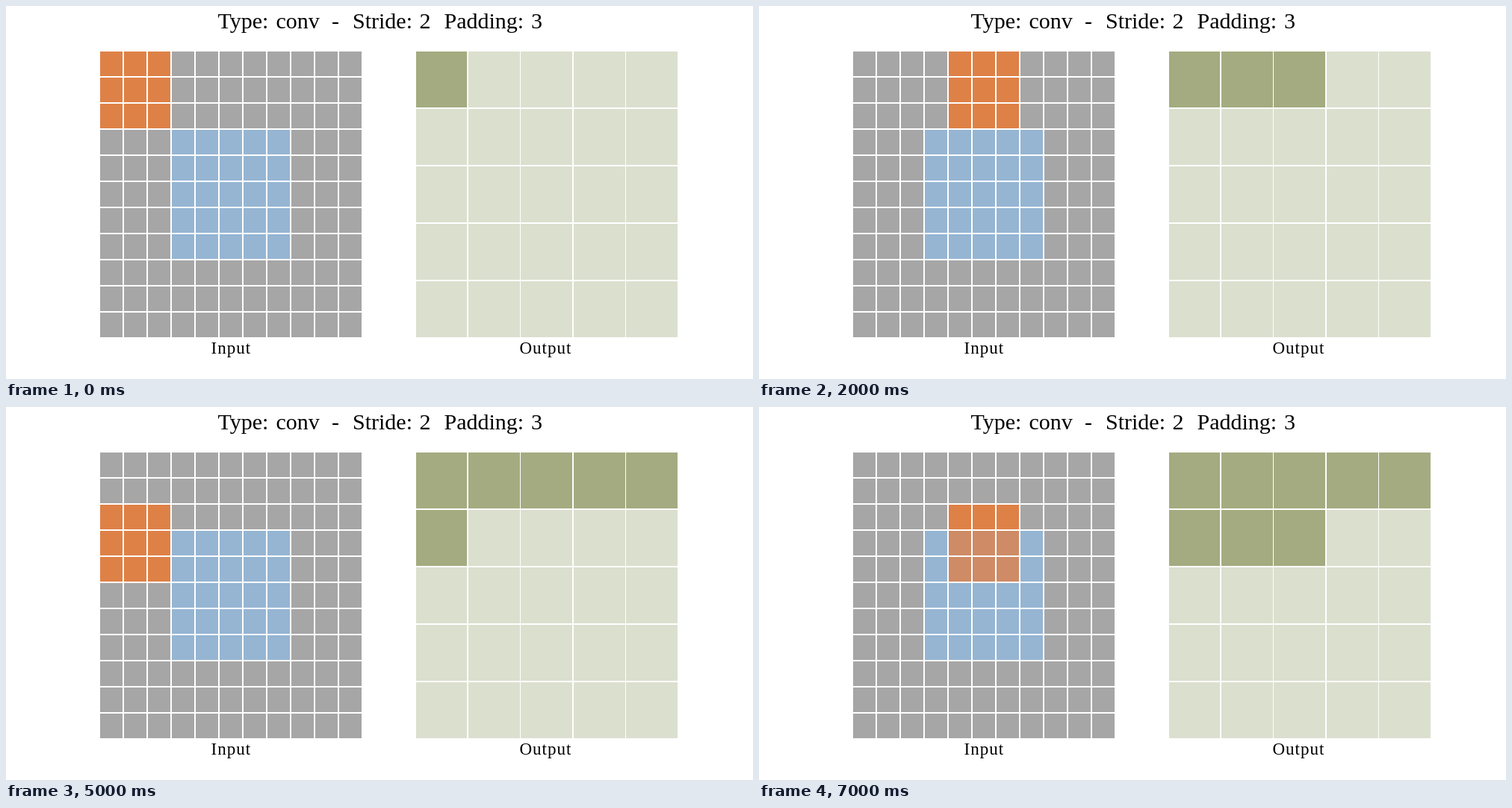
These frames come from a looping animation (1000 by 500 pixels, 8000 ms). An HTML page with a canvas:

```html
<!DOCTYPE html>
<html lang="en">
<head>
<meta charset="utf-8">
<title>Convolution</title>
<style>
  html, body { margin: 0; width: 100%; height: 100%; overflow: hidden; background: #fff; }
  canvas, svg { position: absolute; left: 0; top: 0; }
  text { font-family: "Liberation Serif", "Times New Roman", serif; fill: #000; }
  .title { font-size: 30px; }
  .label { font-size: 23px; letter-spacing: 1px; }
</style>
</head>
<body>
<canvas id="stage" width="1000" height="500"></canvas>
<svg width="1000" height="500">
  <g class="title">
    <text x="283.5" y="30">Type:</text>
    <text x="361.5" y="30">conv</text>
    <text x="436" y="30">-</text>
    <text x="464" y="30">Stride:</text>
    <text x="553.5" y="30">2</text>
    <text x="586.5" y="30">Padding:</text>
    <text x="703" y="30">3</text>
  </g>
  <g class="label">
    <text x="274.5" y="466">Input</text>
    <text x="687.5" y="466">Output</text>
  </g>
</svg>
<script>
const ctx = document.getElementById('stage').getContext('2d');
const STEP = 1000, STEPS = 8;
const INPUT = 11, OUTPUT = 5, KERNEL = 3, STRIDE = 2, PADDING = 3;
const GRAY = '#a6a6a6', BLUE = '#95b5d3', ORANGE = '#de8147', BLEND = '#ce8b66';
const PALE = '#dbdfce', GREEN = '#a4ab80';

const inside = (v, start, size) => v >= start && v < start + size;

function fillCell(color, left, top, right, bottom) {
  ctx.fillStyle = color;
  ctx.fillRect(left, top, right - left, bottom - top);
}

function drawInput(row, col) {
  for (let r = 0; r < INPUT; r++) {
    for (let c = 0; c < INPUT; c++) {
      const data = inside(r, PADDING, 5) && inside(c, PADDING, 5);
      const hit = inside(r, row * STRIDE, KERNEL) && inside(c, col * STRIDE, KERNEL);
      const color = hit ? (data ? BLEND : ORANGE) : (data ? BLUE : GRAY);
      const x = 125 + 32 * c, y = 60 + 35 * r;
      fillCell(color, x + 1, y + 1, x + 31, y + 34);
    }
  }
}

function drawOutput(step) {
  const edge = i => 548 + 70.4 * i;
  for (let r = 0; r < OUTPUT; r++) {
    for (let c = 0; c < OUTPUT; c++) {
      const color = r * OUTPUT + c <= step ? GREEN : PALE;
      const left = Math.round(edge(c) + 0.6);
      const right = Math.round(edge(c + 1) - 1);
      const y = 60 + 77 * r;
      fillCell(color, left, y + 1, right, y + 76);
    }
  }
}

function draw(time) {
  const step = Math.floor(time / STEP) % STEPS;
  ctx.fillStyle = '#fff';
  ctx.fillRect(0, 0, 1000, 500);
  drawInput(Math.floor(step / OUTPUT), step % OUTPUT);
  drawOutput(step);
}

let start;
function tick(now) {
  start ??= now;
  draw(now - start);
  requestAnimationFrame(tick);
}
draw(0);
requestAnimationFrame(tick);
</script>
</body>
</html>
```
